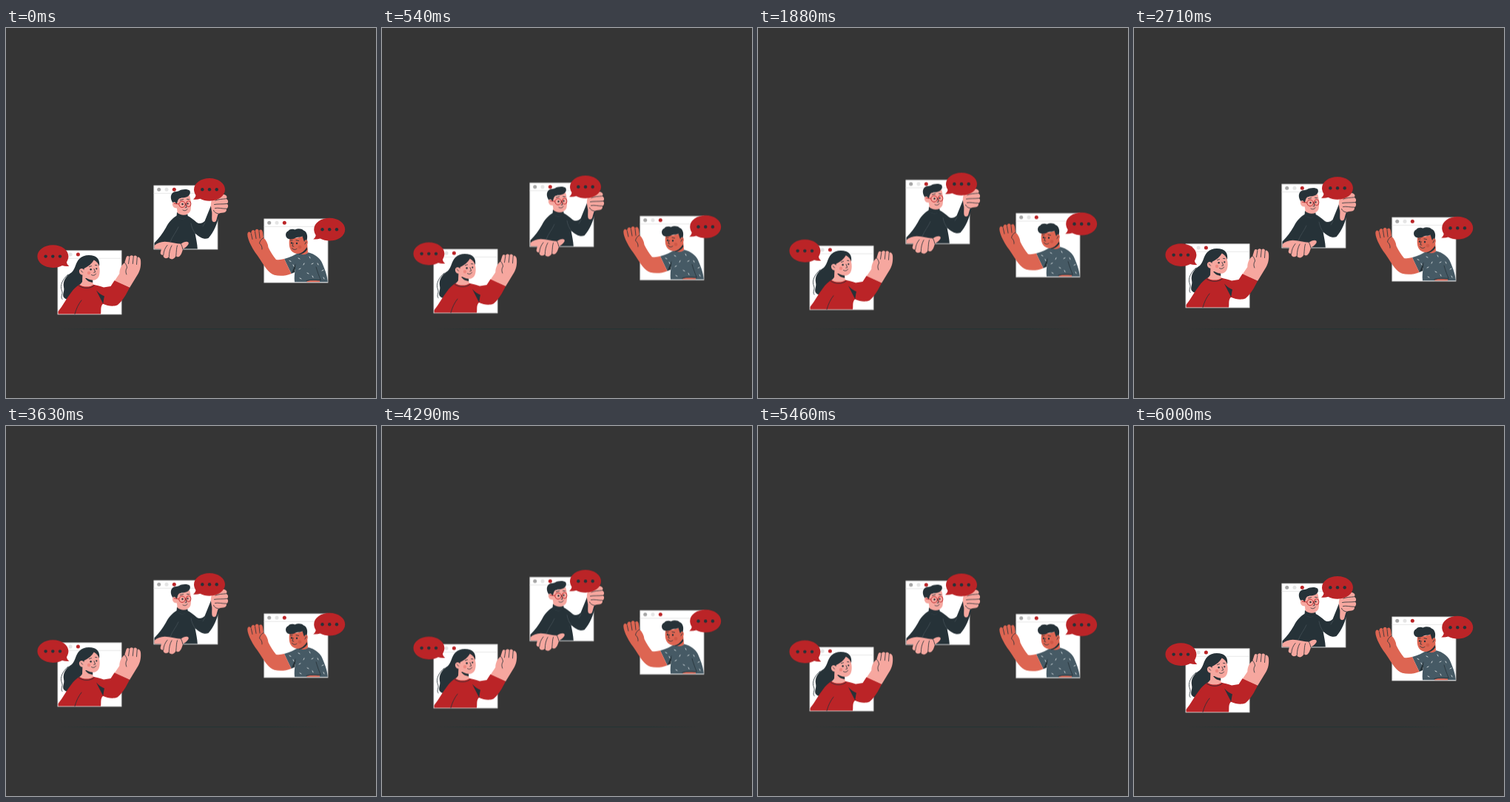
An HTML page for the animation above (6040 ms loop, 500 by 500 pixels).

```html
<!DOCTYPE html>
<html lang="en">
<head>
<meta charset="utf-8">
<title>Video chat</title>
<style>
  html, body { margin: 0; width: 100%; height: 100%; overflow: hidden; background: #353535; }
  svg { display: block; width: 100vw; height: 100vh; }
  .red { fill: #bb2427; }
  .ink { fill: #263238; }
  .pink { fill: #f6a79f; }
  .tan { fill: #dd6552; }
  .denim { fill: #465a65; }
  .line { fill: none; stroke: #263238; stroke-width: .8; stroke-linecap: round; stroke-linejoin: round; }
  .fold { fill: none; stroke: #4d5961; stroke-width: .6; stroke-linecap: round; }
  .speck { fill: none; stroke: #dce2e5; stroke-width: .9; stroke-linecap: round; }

  /* The loop rests for its last 40 ms. */
  .quick { animation: quick 6040ms linear infinite; }
  .slow { animation: slow 6040ms linear infinite; }
  @keyframes quick {
    0%, 49.669%, 99.338%, 100% { transform: translateY(0); }
    24.834%, 74.503% { transform: translateY(-10px); }
  }
  @keyframes slow {
    0%, 99.338%, 100% { transform: translateY(0); }
    49.669% { transform: translateY(-10px); }
  }
</style>
</head>
<body>
<svg viewBox="0 0 500 500">
  <defs>
    <g id="window">
      <rect x=".2" y=".2" width="86" height="86" fill="#fff" stroke="#d9d9d9" stroke-width=".9"/>
      <path d="M0 10.600H86" stroke="#e3e3e3" stroke-width=".8"/>
      <circle cx="7" cy="5.400" r="2.500" fill="#a6a6a6"/>
      <circle cx="17.300" cy="5.400" r="2.500" fill="#e4e4e4"/>
      <circle cx="27.600" cy="5.400" r="2.500" class="red"/>
    </g>
    <path id="balloon" class="red" d="M-21 0C-21-8.600-11.600-15.400 0-15.400S21-8.600 21 0S11.600 15.400 0 15.400C-4.800 15.400-9 14.400-12.600 12.400C-15.400 13.300-18.600 13.600-22 13.200C-20 11.700-18.900 10-18.500 7.800C-20 5.400-21 2.800-21 0Z"/>
    <g id="dots" class="ink">
      <circle cx="-9.700" r="2.200"/><circle r="2.200"/><circle cx="9.700" r="2.200"/>
    </g>
    <linearGradient id="fade">
      <stop offset="0" stop-color="#263434" stop-opacity="0"/>
      <stop offset=".2" stop-color="#263434"/>
      <stop offset=".8" stop-color="#263434"/>
      <stop offset="1" stop-color="#263434" stop-opacity="0"/>
    </linearGradient>
  </defs>

  <rect x="70" y="406" width="360" height="1.400" fill="url(#fade)"/>

  <!-- Woman -->
  <g class="slow">
    <use href="#window" x="69.800" y="300.700"/>
    <path class="line" d="M84 333C76 340 72.500 348 75.500 355C77.500 360 73 363 76 366.500"/>
    <path class="ink" d="M99 312C94 317 94 325 89 330C81 335 76.500 342 78 350C79.500 356 75.500 360 78 364C82 369 89 367 94 363L107 350L112 326L126 321.500C127 316 125 310.500 119.500 308.300C112 305.800 104 307 99 312Z"/>
    <path class="pink" d="M103.500 331L103 343C101.500 345.500 100 346.500 98.500 347.300C104 352 114 352 119 347.300C117.500 346 117 344.500 117 338Z"/>
    <path class="ink" d="M107 338C109 341.500 113 343.500 117.200 344V338Z"/>
    <path class="pink" d="M105.500 325C111 322.500 116 318.500 118.800 313.500C122.500 315.500 125.300 318.500 126 322.500C127 327 127 331 125.700 335C124 340 119 341.700 114 340.300C109 339 106 336.500 104.800 333.500C101 334.500 98.300 331 99 327.500C100 324.300 103.500 324 105.500 327Z"/>
    <path class="line" d="M101.300 327.800L103.500 330.200M112.500 322.600L115.500 321.600M120.500 320.400L123 320.700M119 325.500L120.700 329.800L118.800 330.300M115.500 333.600C118 335.200 120.500 334 121.500 332.200"/>
    <circle class="ink" cx="114.600" cy="326.200" r="1.200"/>
    <circle class="ink" cx="122.300" cy="325.300" r="1.100"/>
    <circle cx="112" cy="331" r="2.200" fill="#e9756c" opacity=".6"/>

    <path class="pink" d="M146.500 342L153.300 332C153.300 325 156.500 320 160.300 317L162.300 310.500C163 307.200 166.400 307.300 166.800 310C167.400 306.300 171.600 306.400 172.200 309.300C173.300 306.500 177 307 177.200 310C178.800 308.500 181.600 310 182 314C182.600 320 181.800 327 178 333L167 351Z"/>
    <path class="line" d="M166.800 310L165.500 318.500M172.200 309.300L171.300 318.500M177.200 310L176.500 319.500M160.300 317C162 319 163.500 321.500 163.500 324C161.500 327 161.500 330 162.800 333"/>

    <path class="red" d="M70.500 386.600V383C77 375 82 365 88 357.500C91 353 95 349.500 99 346.700C105 350.500 113 350.500 118.500 346.700C122 347.500 127 348.500 132 350.500L141.500 349L146.500 341.200L167 350.700C162.500 360 157.500 369 150.500 374.500C145.500 376.500 138 376 131 372.800C127 377 129 382 128 386.600Z"/>
    <path class="ink" d="M122 354.500L131.300 372.800C131.800 368.500 132.300 365 133 362.500C129 361 125 358 122 354.500Z"/>
    <path class="line" d="M93 386.500C95 379 98 373 102 368M98 348C104 352.500 114 352.500 119 348.200"/>
  </g>

  <!-- Man with glasses -->
  <g class="quick">
    <use href="#window" x="199.700" y="212.800"/>
    <path class="ink" d="M200.500 298.600V290.500C207 284 212 277 216 270C219.500 263 224 257.500 231 253.500L245 253.500C250 256 253.500 259 257.500 262.500C261 265 265 264.500 268.500 261L277 240L288.500 251.500C285.500 264 281 276 273.500 284C268 286.500 262 283 255.500 277.500C257 285 258.500 292 258.800 298.600Z"/>
    <path class="fold" d="M231 255C236 259 241 259 245 255M222 289C225 281 230 276 233 269M250 264C251 270 253 274 256 278M269 263L266 268"/>
    <path class="pink" d="M231 241L231.500 251C235 255 242 255 245 251.500L244.500 246Z"/>
    <path class="ink" d="M231 249C235 253 241 253.800 245.500 251.500V256.500C240 259 234 258 230.500 255Z"/>
    <path class="pink" d="M230 230C236 231 242 229 248 226C249.800 231 250.800 239 249.600 245.500C248.600 251 243 253 238 251C234 249.500 231.500 246.500 230.500 243.300C227 243.800 224.300 240.500 225 236.500C226 233.500 229 234.500 230 237Z"/>
    <path class="ink" d="M225.300 236C222.300 231.500 221.800 226 225 223C227.500 220.500 231 221.500 234 220C238 217.500 245.500 217.300 248.200 219.800C249.800 222.500 248.500 226.300 245 228C241 230 236.500 228.800 233.500 231C231.800 232.800 231.600 236 230.500 238.500C229.500 235 227 234 225.300 236Z"/>
    <g fill="none" stroke="#bb2427" stroke-width=".9">
      <circle cx="238" cy="238.300" r="4.200"/>
      <ellipse cx="246.700" cy="237.600" rx="3.200" ry="4"/>
      <path d="M242.200 237.500L243.500 237.300M233.800 238L227 237"/>
    </g>
    <path class="line" d="M235.500 232.600L239.500 231.600M244.500 231.300L247.500 231.600M242.600 238L244 242.500L242 242.800M239 246C241.500 247.600 244 246.600 245 244.700"/>
    <circle class="ink" cx="238.500" cy="238" r="1.200"/>
    <circle class="ink" cx="245.500" cy="237.300" r="1.100"/>

    <path class="pink" d="M276.800 240C277 233 279 228 284 225.500C289 223.500 294 224 297 226C299.300 227.700 298.600 230 297 230.800C300.500 231.500 301 236 298.700 237.500C301 239.500 300.300 243 298 244.200C298.500 246.800 297 249 294 249.500C291 250 288.500 250 287 251C285.500 254 285 257.500 284 260.500C282.500 263 279 262.500 278.500 260C277.800 255 279 250 277.800 247Z"/>
    <path class="line" d="M297 230.800C292 231.300 287 231.300 283 233M298.700 237.500C292 238.300 286 237.500 281.500 238.500M298 244.200C292 244.300 287 242.500 282.500 243.500M287 251C284 250.500 281.500 249 280.500 246.500"/>

    <path class="pink" d="M200.500 298.500V294C204 291 209 288.800 214.500 288.800C222 288.800 230 291.500 236.500 291.800C240 289.300 244.500 287.800 246.500 289.800C248 292.500 243.500 296 239 299C238 303 236.500 307.500 233.800 309C231.800 309.800 230 309 229.800 307.500C228.500 311 225.800 312.800 223.300 312.300C221.300 312 220.300 310.800 220.300 309.300C218.300 311.500 215.500 311.800 213.800 310.300C212.500 309.300 212.500 308 212.800 306.500C210.300 307.300 208.300 306 208.700 303.500L210 298.500Z"/>
    <path class="line" d="M212.800 306.500C213 301.500 215 297 218 293.500M220.300 309.300C220.300 304 221.500 298 224 294M229.800 307.500C230.300 302 230.300 297 231.500 294M236.500 291.800C237.500 294 238.500 296.500 239 299"/>
  </g>

  <!-- Man waving -->
  <g class="quick">
    <use href="#window" x="348.700" y="257.800"/>
    <path class="denim" d="M376 312C384 310 390 306.500 396 303.500C401 307 406 305.500 408.500 303.300C417 305.500 423 310 426.500 316C430 324 434 333 434.800 343.300H390C389.300 337 390 331 391 325.500L385.500 332Z"/>
    <path class="ink" d="M391.500 318L385.500 332L390.300 330Z"/>
    <path class="tan" d="M406 343.300C407 341 412 341 424 341.500V343.300Z"/>
    <path class="line" d="M406 341.500C412 339.500 418 340 425 340.500M419 323C421 330 423 335 425 340"/>
    <path class="speck" d="M383 314.500l2 1M395 311l2 1M388 320l1 2M403 318l-1 2M410 309l1 2M413 319l2-1M396 326l2-1M407 331l2 1M414 335l1 2M421 318l1 2M427 328l2-1M397 338l2 1M429 337l1 2"/>

    <path class="tan" d="M396 297V304C400 307.500 405.500 306.500 408 303.500L407 290Z"/>
    <path class="ink" d="M395.500 305C400.500 304 404 300.500 406.500 296L407.300 299C404.500 303.500 400.500 305.800 396 306Z"/>
    <path class="tan" d="M383.500 283C390 284 396 284 402 281C402.500 284 402.500 286 403 288C404 285 407.500 285.500 407.800 289C408 292.500 405.500 295.500 402.500 295C402 300 399.500 304.300 395 305C389 305.500 384 301 383 295C382.500 291 382.500 287 383.500 283Z"/>
    <path class="ink" d="M380 284C377 281 377.500 276 381.500 274.300C383.500 271.500 387.500 271.300 390.500 272.500C394.500 270.500 400 271.300 402 273.500C406.300 275 408.300 280.500 406.500 287C405 285.500 403.800 286.500 403.300 289C401.800 287.500 401.800 284.500 400.500 281.500C397 283.500 393.500 282 391 283.800C387.500 286 383 286 380 284Z"/>
    <path class="line" d="M384.500 287.300L387 286.800M392 286.800L395.500 287.500M388.300 290.500L386.800 294.700L388.800 295.200M386.500 297.500C388.500 300 391 300 393 298.300M405.800 289L404 292"/>
    <circle class="ink" cx="386" cy="290.500" r="1.200"/>
    <circle class="ink" cx="393" cy="291" r="1.200"/>
    <circle cx="397" cy="296" r="2.300" fill="#c14b3b" opacity=".5"/>

    <path class="tan" d="M376 312L385.500 332C378 335.300 369 335.500 362.500 333.800C355 331.500 349 321.500 343.500 313C339 306 333.500 299.500 331 293.500C328 287.500 325.600 281 326.500 277.500C327.300 274.500 330.500 275 331.300 278C330.800 273 335.300 271.300 336.500 275.500C336.500 271 341 270.500 342 275C342.500 271.500 346.300 271.800 347 276L348 283.500C351.500 286.500 354 291.500 354.500 296.500C357.500 302.500 361 308 365 313C369 313.500 372.500 313 376 312Z"/>
    <path class="line" d="M331.300 278L333 285.500M336.500 275.500L338 284.500M342 275L343 284M348 283.500C345 285 343 288 342.500 291C345 293 346.500 296 346 299"/>
  </g>

  <!-- Speech bubbles -->
  <g class="quick">
    <use href="#balloon" transform="translate(63.400 308.600) scale(-1 1)"/>
    <use href="#dots" x="63.300" y="308.600"/>
    <use href="#balloon" x="275" y="218.300"/>
    <use href="#dots" x="275" y="218.300"/>
    <use href="#balloon" x="437.200" y="272.200"/>
    <use href="#dots" x="437.200" y="272.200"/>
  </g>
</svg>
</body>
</html>
```
